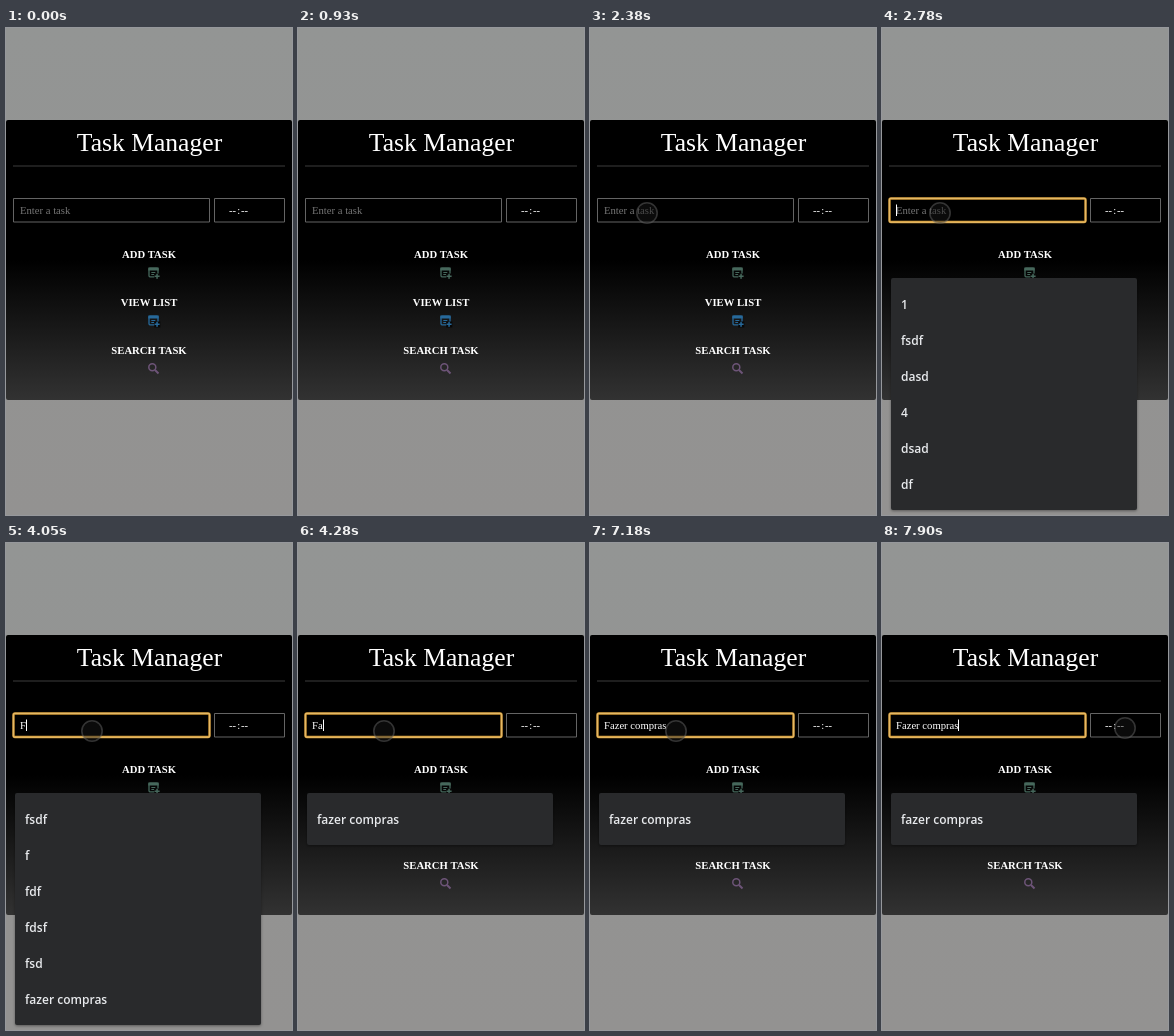
Animation of 286x487 px, one loop 8 s. Source, as an HTML page with a canvas:

```html
<!DOCTYPE html>
<html lang="en">
<head>
<meta charset="utf-8">
<title>Task Manager</title>
<style>
  html, body { margin: 0; width: 100%; height: 100%; overflow: hidden; background: #939493; }
  canvas { display: block; width: 286px; height: 487px; }
</style>
</head>
<body>
<canvas id="stage"></canvas>
<script>
const W = 286, H = 487, LOOP = 8000;
const canvas = document.getElementById('stage');
const ctx = canvas.getContext('2d');
const dpr = window.devicePixelRatio || 1;
canvas.width = W * dpr;
canvas.height = H * dpr;
ctx.scale(dpr, dpr);

const SERIF = '"Liberation Serif", "Times New Roman", serif';
const SANS = '"Open Sans", "Noto Sans", sans-serif';
const FIELD = '10.67px ' + SERIF;

const PHRASE = 'Fazer compras';
const KEY_TIMES = [3975, 4280, 4600, 4830, 5060, 5230, 5450, 5600, 5750, 6000, 6400, 6550, 6700];

const LISTS = [
  { from: 2780, items: ['1', 'fsdf', 'dasd', '4', 'dsad', 'df'] },
  { from: 4050, items: ['fsdf', 'f', 'fdf', 'fdsf', 'fsd', 'fazer compras'] },
  { from: 4280, items: ['fazer compras'] }
];

// Pointer strokes: start, end, steps, then start, control and end points.
const MOVES = [
  { t0: 1390, t1: 1930, n: 8, p: [230, 473, 110.6, 176, 15, 182] },
  { t0: 2140, t1: 2380, n: 4, p: [24, 182, 42, 184, 57, 185] },
  { t0: 2780, t1: 3030, n: 4, p: [58, 185, 74, 187, 86, 188] },
  { t0: 7330, t1: 7730, n: 6, p: [98, 191, 180, 206, 246, 185] },
  { t0: 7900, t1: 8000, n: 1, p: [243, 185, 243, 185, 243, 185] }
];

function text(str, x, y, font, color, align = 'left') {
  ctx.font = font;
  ctx.fillStyle = color;
  ctx.textAlign = align;
  ctx.fillText(str, x, y);
}

function box(x, y, w, h, r) {
  ctx.beginPath();
  ctx.roundRect(x, y, w, h, r);
}

function outline(x, y, w, h, r, color, width) {
  box(x, y, w, h, r);
  ctx.strokeStyle = color;
  ctx.lineWidth = width;
  ctx.stroke();
}

function calendarIcon(x, y, color) {
  outline(x + 0.7, y + 0.7, 9, 8.6, 1, color, 1.3);
  ctx.fillStyle = color;
  ctx.fillRect(x, y, 10.4, 3);
  ctx.fillRect(x + 3, y + 4.5, 4, 1);
  ctx.fillRect(x + 3, y + 6.5, 3, 1);
  ctx.fillStyle = '#080808';
  ctx.fillRect(x + 6, y + 6, 6, 6);
  ctx.fillStyle = color;
  ctx.fillRect(x + 8, y + 6.3, 1.5, 5);
  ctx.fillRect(x + 6.3, y + 8, 5, 1.5);
}

function searchIcon(x, y, color) {
  ctx.strokeStyle = color;
  ctx.lineWidth = 1.5;
  ctx.beginPath();
  ctx.arc(x + 4.3, y + 4.3, 3.5, 0, Math.PI * 2);
  ctx.stroke();
  ctx.lineWidth = 2;
  ctx.beginPath();
  ctx.moveTo(x + 7, y + 7);
  ctx.lineTo(x + 10.5, y + 10.5);
  ctx.stroke();
}

function drawPage() {
  const back = ctx.createLinearGradient(0, 0, 0, H);
  back.addColorStop(0, '#939594');
  back.addColorStop(1, '#939291');
  ctx.fillStyle = back;
  ctx.fillRect(0, 0, W, H);

  const panel = ctx.createLinearGradient(0, 92, 0, 372);
  panel.addColorStop(0, '#000');
  panel.addColorStop(0.5, '#000');
  panel.addColorStop(1, '#323232');
  box(0, 92, W, 280, 2);
  ctx.fillStyle = panel;
  ctx.fill();

  text('Task Manager', 143.5, 123, '25.6px ' + SERIF, '#fff', 'center');
  ctx.fillStyle = '#3c3c3c';
  ctx.fillRect(7, 137.5, 272, 1);

  outline(7.5, 170.5, 196, 23.5, 0, '#646464', 1);
  outline(208.5, 170.5, 70, 23.5, 0, '#646464', 1);
  text('--', 223, 186, FIELD, '#fff');
  text(':', 231.2, 186, FIELD, '#fff');
  text('--', 235, 186, FIELD, '#fff');

  ['ADD TASK', 'VIEW LIST', 'SEARCH TASK'].forEach((label, i) =>
    text(label, 143, 230 + 48 * i, 'bold ' + FIELD, '#fff', 'center'));
  calendarIcon(142.3, 239.5, '#46685c');
  calendarIcon(142.3, 287.5, '#27699a');
  searchIcon(142, 335, '#6d5478');
}

function caretOn(t) {
  return !(t >= 3420 && t < 3900) && !(t >= 7180 && t < 7650);
}

function drawField(t) {
  const typed = PHRASE.slice(0, KEY_TIMES.filter(k => t >= k).length);
  if (t >= 2780) {
    outline(7.5, 170.5, 196, 23.5, 1.5, '#d29a38', 2.4);
    outline(7.3, 170.3, 196.4, 23.9, 1.5, '#f0cb80', 0.8);
  }
  if (typed) text(typed, 14, 186, FIELD, '#fff');
  else text('Enter a task', 14, 186, FIELD, '#757575');
  if (t >= 2780 && caretOn(t)) {
    ctx.font = FIELD;
    const x = 14 + Math.round(ctx.measureText(typed).width);
    ctx.fillStyle = '#fff';
    ctx.fillRect(x, 176.5, 1, 11.5);
  }
}

function drawList(t) {
  const list = LISTS.filter(l => t >= l.from).pop();
  if (!list) return;
  ctx.save();
  ctx.shadowColor = 'rgba(0,0,0,.4)';
  ctx.shadowBlur = 3 * dpr;
  ctx.shadowOffsetY = dpr;
  box(9, 250, 246, 16 + 36 * list.items.length, 2);
  ctx.fillStyle = '#292a2c';
  ctx.fill();
  ctx.restore();
  list.items.forEach((item, i) =>
    text(item, 19, 280.5 + 36 * i, '600 12px ' + SANS, '#e8eaed'));
}

function pointerAt(t) {
  if (t >= 460 && t < 530) return [287, 487];
  if (t >= 760 && t < 845) return [274, 486];
  if (t >= 845 && t < 930) return [263, 478];
  const m = MOVES.filter(s => t >= s.t0).pop();
  if (!m) return null;
  const last = Math.max(1, m.n - 1);
  const k = Math.floor((t - m.t0) / (m.t1 - m.t0) * last + 0.01);
  const u = Math.min(1, k / last), v = 1 - u;
  const [x0, y0, cx, cy, x1, y1] = m.p;
  const mix = (a, b, c) => v * v * a + 2 * u * v * b + u * u * c;
  return [mix(x0, cx, x1), mix(y0, cy, y1)];
}

function drawPointer(t) {
  const pos = pointerAt(t);
  if (!pos) return;
  ctx.beginPath();
  ctx.arc(pos[0], pos[1], 10.2, 0, Math.PI * 2);
  ctx.fillStyle = 'rgba(24,24,24,.45)';
  ctx.fill();
  ctx.strokeStyle = 'rgba(100,100,100,.5)';
  ctx.lineWidth = 1.6;
  ctx.stroke();
}

const start = performance.now();
function frame() {
  const t = (performance.now() - start) % LOOP;
  drawPage();
  drawField(t);
  drawList(t);
  drawPointer(t);
  requestAnimationFrame(frame);
}
frame();
</script>
</body>
</html>
```
